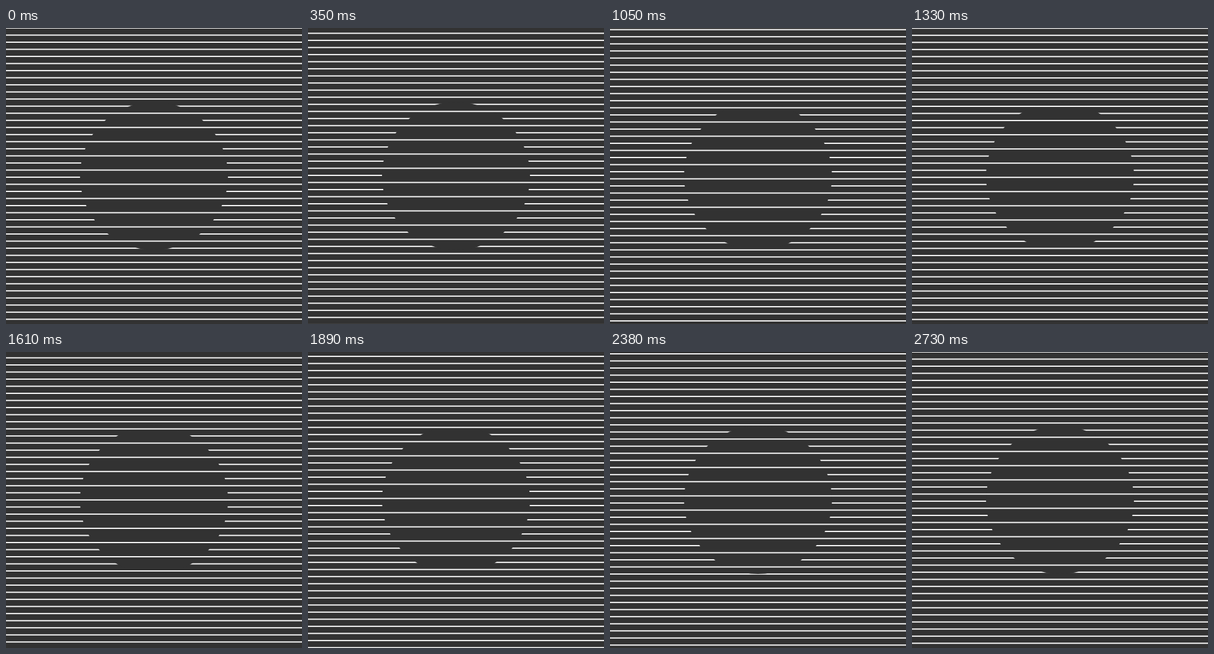
These frames come from a looping animation (480x480 px, 2.8 s). An HTML page with a canvas:

```html
<!DOCTYPE html>
<html lang="en">
<head>
<meta charset="utf-8">
<title>Drifting lines</title>
<style>
  html, body { margin: 0; width: 100%; height: 100%; overflow: hidden; background: #323232; }
  canvas { display: block; width: 480px; height: 480px; }
</style>
</head>
<body>
<canvas id="stage" width="480" height="480"></canvas>
<script>
  const ctx = document.getElementById('stage').getContext('2d');
  const SIZE = 500, GAP = 12, WEIGHT = 2, RADIUS = 125;
  const STEP = 70, STEPS = 40;
  const BACK = '#323232', INK = '#fafafa';

  ctx.scale(480 / SIZE, 480 / SIZE);

  // Every second line, starting at index `first`
  function lines(first, shift) {
    ctx.fillStyle = INK;
    for (let y = first * GAP - shift; y < SIZE + GAP; y += 2 * GAP) {
      ctx.fillRect(0, y - WEIGHT / 2, SIZE, WEIGHT);
    }
  }

  function draw(step) {
    const shift = 2 * GAP * step / (STEPS - 1);
    ctx.fillStyle = BACK;
    ctx.fillRect(0, 0, SIZE, SIZE);
    lines(1, shift);
    // The disc hides the odd lines only
    ctx.fillStyle = BACK;
    ctx.beginPath();
    ctx.arc(SIZE / 2, SIZE / 2, RADIUS, 0, 2 * Math.PI);
    ctx.fill();
    lines(0, shift);
  }

  const start = performance.now();
  function tick() {
    const t = Math.max(0, performance.now() - start);
    draw(Math.floor(t / STEP) % STEPS);
    requestAnimationFrame(tick);
  }
  tick();
</script>
</body>
</html>
```
